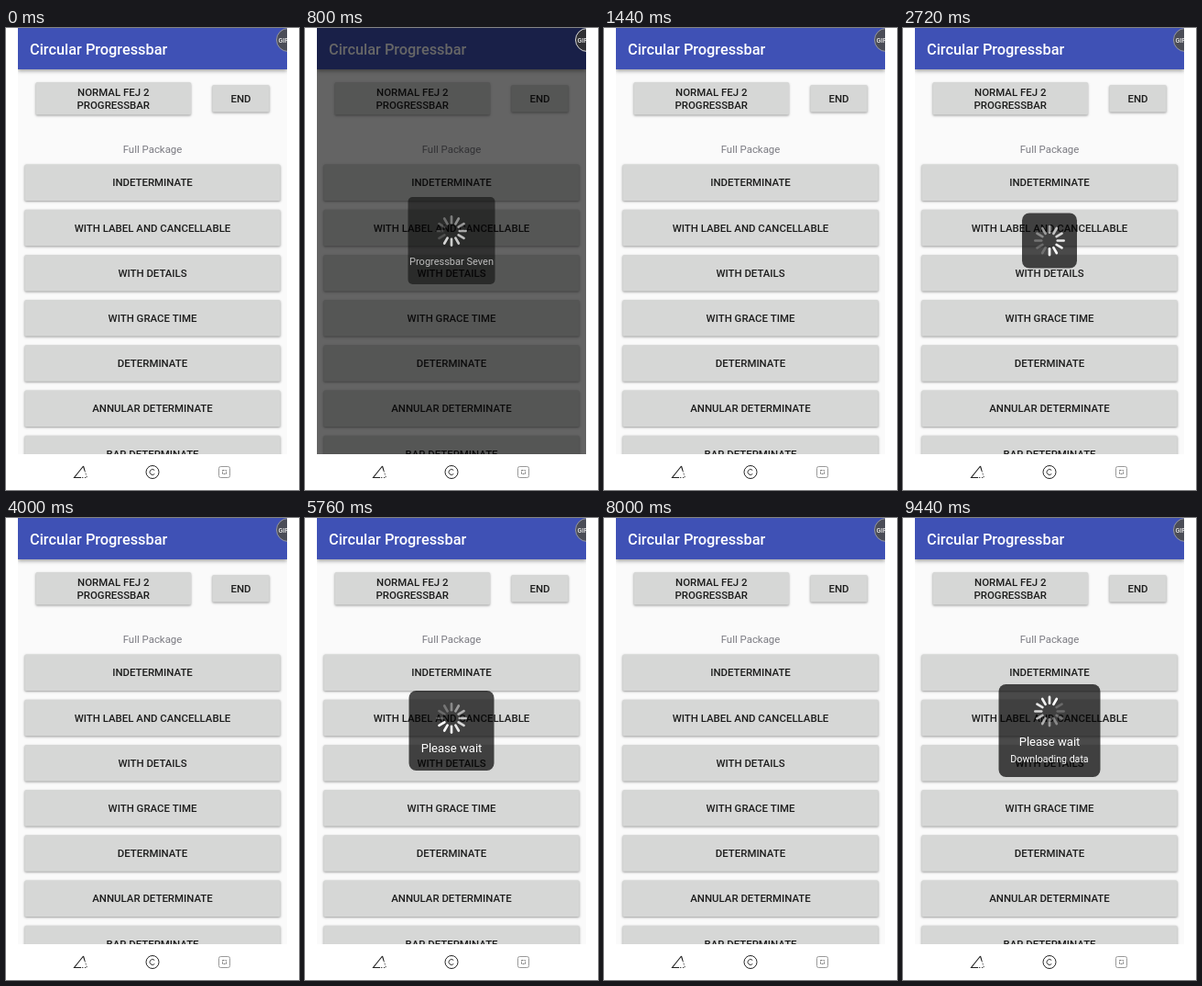
Recreate the animation shown at these times as an HTML page with a canvas. Size 320 by 503 pixels, loop 9.6 s.

```html
<!DOCTYPE html>
<html lang="en">
<head>
<meta charset="utf-8">
<title>Circular Progressbar</title>
<style>
html, body { margin: 0; width: 100%; height: 100%; overflow: hidden; background: #fff; }
canvas { display: block; width: 320px; height: 503px; }
</style>
</head>
<body>
<canvas id="stage"></canvas>
<script>
const LOOP = 9600, STEP = 160, MID = 231.5;
const canvas = document.getElementById('stage');
const ctx = canvas.getContext('2d');
const ratio = window.devicePixelRatio || 1;
canvas.width = 320 * ratio;
canvas.height = 503 * ratio;
ctx.scale(ratio, ratio);

const LABELS = ['INDETERMINATE', 'WITH LABEL AND CANCELLABLE', 'WITH DETAILS',
  'WITH GRACE TIME', 'DETERMINATE', 'ANNULAR DETERMINATE', 'BAR DETERMINATE'];

// Each line of a dialog is [text, baseline, size].
const DIALOGS = [
  { from: 800, to: 1440, w: 95, h: 95, spinY: 221, inner: 8, lead: 7, rate: 9, delay: 0,
    dim: 0.6, shade: 0.5, ink: '#bdbdbd', lines: [['Progressbar Seven', 258, 11]] },
  { from: 2080, to: 4000, w: 60, h: 60, spinY: MID, lines: [] },
  { from: 4960, to: 6880, w: 93, h: 87, spinY: 218, lines: [['Please wait', 254.7, 13.07]] },
  { from: 8160, to: LOOP, w: 111, h: 101, spinY: 210.5,
    lines: [['Please wait', 247.6, 13.07], ['Downloading data', 266, 10.62]] }
].map(d => ({ inner: 8, lead: 0, rate: 12, delay: 125, dim: 0, shade: 0.7, ink: '#fff', ...d }));

function text(str, x, y, size, color, weight = 400, align = 'center') {
  ctx.font = `${weight} ${size}px Roboto, sans-serif`;
  ctx.textAlign = align;
  ctx.fillStyle = color;
  ctx.fillText(str, x, y);
}

function box(x, y, w, h, r, color) {
  ctx.fillStyle = color;
  ctx.beginPath();
  ctx.roundRect(x, y, w, h, r);
  ctx.fill();
}

function shadow(blur, drop, alpha, draw) {
  ctx.save();
  ctx.shadowColor = `rgba(0,0,0,${alpha})`;
  ctx.shadowBlur = blur * ratio;
  ctx.shadowOffsetY = drop * ratio;
  draw();
  ctx.restore();
}

function button(x, y, w, h, lines) {
  shadow(2.5, 1, 0.38, () => box(x, y, w, h, 1.6, '#d6d7d6'));
  lines.forEach((line, i) =>
    text(line, x + w / 2, y + h / 2 + 4.1 + (i - (lines.length - 1) / 2) * 13.4,
      11.43, 'rgba(0,0,0,.87)', 500));
}

function screen() {
  ctx.fillStyle = '#fafafa';
  ctx.fillRect(13, 0, 294, 464);
  shadow(4, 1.5, 0.35, () => box(13, -6, 294, 51, 0, '#3f51b5'));
  text('Circular Progressbar', 26, 29, 16.33, '#fff', 500, 'left');
  button(32.5, 59, 169.5, 35.5, ['NORMAL FEJ 2', 'PROGRESSBAR']);
  button(225.3, 62, 62.4, 29.5, ['END']);
  text('Full Package', 160, 136.2, 11.43, '#7b7b82');
  LABELS.forEach((label, i) => button(20.3, 148.5 + i * 49.2, 279.4, 39.5, [label]));
}

function badge(dimmed) {
  ctx.beginPath();
  ctx.arc(308, 13, 12.5, 0, 7);
  ctx.fillStyle = dimmed ? '#303034' : '#4b4d57';
  ctx.fill();
  ctx.strokeStyle = dimmed ? '#d8d8d8' : '#94969f';
  ctx.lineWidth = 1;
  ctx.stroke();
  text('GIF', 297.5, 15.7, 7, '#eee', 500, 'left');
}

function line(color, width, dash, trace) {
  ctx.strokeStyle = color;
  ctx.lineWidth = width;
  ctx.setLineDash(dash);
  ctx.beginPath();
  trace();
  ctx.stroke();
  ctx.setLineDash([]);
}

function navBar() {
  ctx.lineCap = 'butt';
  line('#222', 1.1, [], () => {
    ctx.moveTo(84.5, 477);
    ctx.lineTo(74.5, 489.5);
    ctx.lineTo(82, 489.5);
    ctx.moveTo(84.5, 477);
    ctx.lineTo(86, 482);
  });
  line('#444', 1, [1.5, 1.5], () => {
    ctx.moveTo(86, 482);
    ctx.lineTo(88.5, 489.5);
    ctx.lineTo(82, 489.5);
  });
  line('#222', 1, [], () => ctx.arc(160, 483.5, 7, 0, 7));
  line('#333', 1, [], () => ctx.arc(160, 483.5, 3, 0.7, 5.6));
  line('#999', 1, [], () => ctx.roundRect(232.5, 477.5, 12, 12, 2));
  line('#777', 1, [2, 1], () => ctx.rect(236.5, 481.5, 4, 4));
}

function spinner(y, inner, lead) {
  ctx.save();
  ctx.translate(160, y);
  ctx.rotate(lead * Math.PI / 6);
  ctx.lineCap = 'round';
  ctx.lineWidth = 2.7;
  for (let i = 0; i < 12; i++) {
    const glow = i < 4 ? 1 - i * 0.04 : Math.max(0.22, 0.88 - (i - 3) * 0.1);
    ctx.strokeStyle = `rgba(255,255,255,${glow})`;
    ctx.beginPath();
    ctx.moveTo(0, -inner - 0.8);
    ctx.lineTo(0, -15.6);
    ctx.stroke();
    ctx.rotate(-Math.PI / 6);
  }
  ctx.restore();
}

function dialog(d, t) {
  box(160 - d.w / 2, MID - d.h / 2, d.w, d.h, d.dim ? 5 : 8, `rgba(0,0,0,${d.shade})`);
  const turns = Math.floor((t - d.from - d.delay) * d.rate / 1000);
  ctx.globalAlpha = d.dim ? 0.8 : 1;
  spinner(d.spinY, d.inner, d.lead + turns);
  ctx.globalAlpha = 1;
  d.lines.forEach(([str, y, size]) => text(str, 160, y, size, d.ink));
}

function frame(now) {
  const t = Math.floor(now % LOOP / STEP) * STEP;
  const open = DIALOGS.find(d => t >= d.from && t < d.to);
  ctx.fillStyle = '#fff';
  ctx.fillRect(0, 0, 320, 503);
  ctx.save();
  ctx.beginPath();
  ctx.rect(13, 0, 294, 464);
  ctx.clip();
  screen();
  if (open) {
    box(13, 0, 294, 464, 0, `rgba(0,0,0,${open.dim})`);
    dialog(open, t);
  }
  badge(open && open.dim);
  ctx.restore();
  navBar();
  requestAnimationFrame(frame);
}

frame(performance.now());
</script>
</body>
</html>
```
